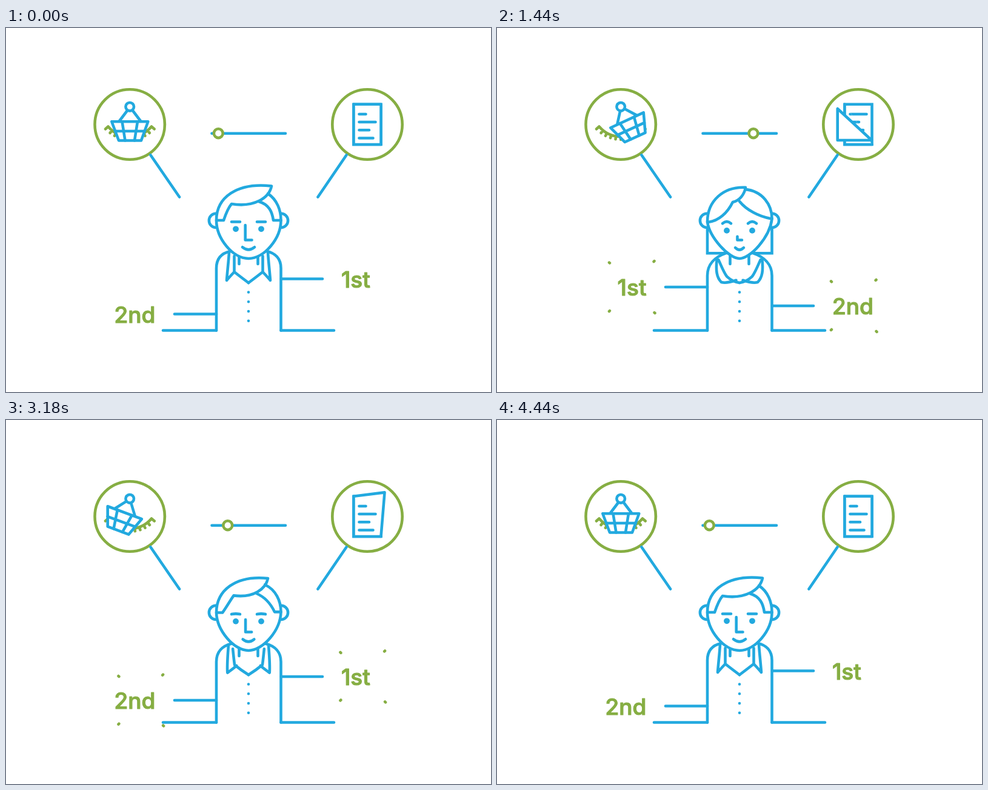
Recreate the animation shown at these times as an HTML page. Size 800 by 600 pixels, loop 4.53 s.

```html
<!DOCTYPE html>
<html lang="en">
<head>
<meta charset="utf-8">
<title>Priorities</title>
<style>
html, body { margin: 0; width: 100%; height: 100%; overflow: hidden; background: #fff; }
svg { display: block; width: 100vw; height: 100vh; }
.b, .g { fill: none; stroke-width: 4.6; stroke-linecap: round; stroke-linejoin: round; }
.b { stroke: #22a9df; }
.g { stroke: #86ae43; }
.w { fill: #fff; }
.miter { stroke-linejoin: miter; }
.dot { fill: #22a9df; stroke: none; }
text {
  font: 500 37px Inter, "Open Sans", sans-serif;
  fill: #86ae43; stroke: #86ae43; stroke-width: 1.2; stroke-linejoin: round;
}
</style>
</head>
<body>
<svg viewBox="0 0 800 600">
  <defs>
    <clipPath id="sheetClip"><path id="sheetArea"/></clipPath>
  </defs>

  <g class="g">
    <circle cx="204.2" cy="159" r="57.7"/>
    <circle cx="596" cy="159" r="57.7"/>
  </g>
  <path class="b" d="M238.5 209.5L286 278.5M561.5 209.5L514.5 278.5M339.5 173.7H461"/>
  <circle id="knob" class="g w" cy="173.7" r="7.4"/>

  <path id="gauge" class="g" stroke-width="4"/>
  <g id="basket" class="b w">
    <path d="M200.5 135.5L186.5 154M208.5 135.5L222.5 154"/>
    <path d="M174.3 154.2H234.3L223 185.5H186Z"/>
    <path d="M180 170H228.5M191.5 154.2L196.5 185.5M217 154.2L212 185.5"/>
    <circle cx="204.2" cy="129.8" r="6.8"/>
  </g>

  <g class="b miter">
    <path class="w" d="M573.5 125.7H618.5V192H573.5Z"/>
    <path d="M583 142H609.5M583 155H597M583 168.3H604M583 181.5H600"/>
    <g clip-path="url(#sheetClip)">
      <path class="w" stroke="none" d="M540 100H650V220H540Z"/>
      <path d="M582.5 142H593.5M582.5 155H609.5M582.5 168.3H599M582.5 181.5H605.5"/>
    </g>
    <path d="M573.5 125.7V192H618.5"/>
    <path id="flap"/>
  </g>

  <g class="b">
    <path id="longHair" class="w miter"/>
    <path id="body" class="w"/>
    <path d="M259 498.5H347M453.5 498.5H541M384.5 375V389M415.5 375V389"/>
    <path id="collarL"/>
    <path id="collarR" transform="matrix(-1 0 0 1 800 0)"/>
    <path class="w" d="M346.5 305.8A11.6 11.6 0 0 0 346.5 329M453.5 305.8A11.6 11.6 0 0 1 453.5 329"/>
    <path id="skin" class="w" style="stroke:none"/>
    <path id="jaw"/>
    <path id="hair"/>
    <path id="features"/>
    <circle id="eyeL" class="dot" cx="379" r="4.9"/>
    <circle id="eyeR" class="dot" cx="421" r="4.9"/>
    <path d="M400 435.5h0M400 451.3h0M400 467h0M400 482.7h0"/>
  </g>

  <path id="barL" class="b"/>
  <path id="barR" class="b"/>
  <g id="labelL" text-anchor="end">
    <text x="246.5">2nd</text><text x="246.5">1st</text>
  </g>
  <g id="labelR">
    <text x="553">1st</text><text x="553">2nd</text>
  </g>
  <path id="sparks" class="g"/>
</svg>

<script>
const LOOP = 4530;
const el = {};
document.querySelectorAll('[id]').forEach(n => el[n.id] = n);

const set = (n, attrs) => { for (const k in attrs) n.setAttribute(k, attrs[k]); };
const clamp = x => Math.max(0, Math.min(1, x));
const part = (t, from, to) => clamp((t - from) / (to - from));
const mix = (a, b, p) => a + (b - a) * p;
const sine = x => (1 - Math.cos(Math.PI * x)) / 2;
const backIn = x => x * x * (3.7 * x - 2.7);

// Ease with level ends; a and b are the x values of the handles.
function ease(x, a, b) {
  let lo = 0, hi = 1;
  for (let i = 0; i < 24; i++) {
    const s = (lo + hi) / 2, r = 1 - s;
    if (3 * r * r * s * a + 3 * r * s * s * b + s * s * s < x) lo = s; else hi = s;
  }
  return lo * lo * (3 - 2 * lo);
}

// Every "a>b" in a path runs from a to b.
const morph = (path, p) => path.replace(/([\d.]+)>([\d.]+)/g,
  (_, a, b) => mix(+a, +b, p).toFixed(2));

const SHAPES = {
  body: 'M347 498.5V396>412C347 380>392 356>361 371>379 370>380 368>372' +
    'L430>420 368>372C444>439 371>379 453.5 380>392 453.5 396>412V498.5',
  longHair: 'M347 317V313.8>388.8H453.5V317',
  jaw: 'M347 317>320.5C347>352 347>345 374>385 380 400 380' +
    'C426>415 380 453.5>448.5 347>345 453.5 317>314',
  hair: 'M347 317>320.5C347 280>286 380>372 254>263 438>401.5 260.5>263.5' +
    'C434>400 280>273 410>397 296>281 372>394 290>286' +
    'C366>384 297>308 362>366 308>321 359>347 317>320.5Z' +
    'M432>402 273>263.7C447>436 283>264 453.5 300>290 453.5 317>313' +
    'L441>453.5 317>313C439>430 303>313 434>405 291>303 417>395 286',
  features: 'M372 319.5>323Q379 319.5>315 386 319.5>323' +
    'M414 319.5>323Q421 319.5>315 428 319.5>323' +
    'M394.7>397 325>349.5V349.5H405.5>403.5' +
    'M390>394 361.3>362.5Q400 369.5>369 410>406 361.3>362.5'
};
const COLLAR = 'M376.5>362 376>384C376.5>368 385>394 376.5>373 394>405 376.5>380 402>412' +
  'C384>386 408>418 392 414>420.5 400 420' +
  'M368>361 370>385C367>359 386>403 365>361 402>414 364>372 416>420' +
  'C368>380 411>424 372>391 407>422 376.5>400 402>420';

function drawGauge() {
  let d = 'M164 166.5L168.5 162.5A47 47 0 0 0 240 162.5L244.7 166.5';
  for (let i = -4; i <= 4; i++) {
    const a = i * 9.3 * Math.PI / 180, x = Math.sin(a), y = Math.cos(a);
    d += `M${204.2 + x * 49} ${130 + y * 49}L${204.2 + x * 54} ${130 + y * 54}`;
  }
  set(el.gauge, { d });
}

const SWING = [[0, 0], [196, 30], [690, -35], [1115, 20], [1500, -2], [1590, 0]];
function swing(t) {
  const u = t < 2600 ? t - 630 : t < 4440 ? t - 3060 : -1;
  if (u <= 0) return 0;
  for (let i = 1; i < SWING.length; i++) {
    const [a, from] = SWING[i - 1], [b, to] = SWING[i];
    if (u < b) return mix(from, to, sine(part(u, a, b)));
  }
  return 0;
}

function foldAt(t) {
  if (t < 1400) return backIn(part(t, 690, 1090));
  if (t < 2600) return backIn(1 - part(t, 1690, 1970));
  if (t < 3700) return backIn(part(t, 2945, 3300));
  return backIn(1 - part(t, 3880, 4240));
}

function drawSheet(f) {
  const k = Math.max(0, f);
  const tl = `${mix(573.5, 561.7, k)} ${mix(125.7, 133, k)}`;
  const corner = `${mix(618.5, 561.7, f)} ${mix(125.7, 185, f)}`;
  const br = `${mix(618.5, 618, k)} ${mix(192, 185, k)}`;
  const over = f > 0.5;
  set(el.flap, {
    d: `M${tl}L${corner}L${br}${over ? 'Z' : ''}`,
    class: over ? 'w' : '',
    'stroke-linejoin': 'round'
  });
  set(el.sheetArea, { d: `M573.5 125.7L${over ? '' : corner + 'L'}618.5 192L573.5 192Z` });
}

function burst(t, start, x, y) {
  const age = t - start;
  if (age <= 0 || age > 320) return '';
  const r = 1 - Math.exp(-age / 60);
  return [[-37, -40], [36.5, -42.5], [-37, 39.5], [37.5, 42.5]].map(([dx, dy]) =>
    `M${x + dx * r} ${y + dy * r}l${Math.sign(dx) * 0.9} ${Math.sign(dy) * 0.9}`).join('');
}

function setLabel(group, y, swap) {
  [...group.children].forEach((n, i) => set(n, { y: y + 14, opacity: i ? swap : 1 - swap }));
}

function render(t) {
  const p = t < 2500 ? ease(part(t, 630, 2310), 0.715, 0.033)
                     : 1 - ease(part(t, 2571, 3680), 0.8, 0.05);
  for (const id in SHAPES) set(el[id], { d: morph(SHAPES[id], p) });
  set(el.skin, { d: morph(SHAPES.jaw, p) + 'C453.5 246 347 246 347 317Z' });
  const collar = morph(COLLAR, p);
  set(el.collarL, { d: collar });
  set(el.collarR, { d: collar });
  const cy = mix(331.3, 334.7, p);
  set(el.eyeL, { cy });
  set(el.eyeR, { cy });

  const left = mix(471.5, 413.5, p), right = mix(413.5, 471.5, p);
  set(el.barL, { d: `M278 ${left}H347` });
  set(el.barR, { d: `M454 ${right}H522` });
  const swap = part(t, 1197, 1290) - part(t, 2975, 3068);
  setLabel(el.labelL, left, swap);
  setLabel(el.labelR, right, swap);
  set(el.knob, { cx: mix(350.3, 445, p) });

  set(el.basket, { transform: `rotate(${swing(t)} 204.2 129.8)` });
  drawSheet(foldAt(t));
  set(el.sparks, {
    d: burst(t, 870, 350.3, 172.5) + burst(t, 2655, 444.5, 172.5) +
      [1170, 2955].map(s => burst(t, s, 222.5, left) + burst(t, s, 588.5, right)).join('')
  });
}

drawGauge();
render(0);
const begin = performance.now();
function tick() {
  render((performance.now() - begin) % LOOP);
  requestAnimationFrame(tick);
}
requestAnimationFrame(tick);
</script>
</body>
</html>
```
